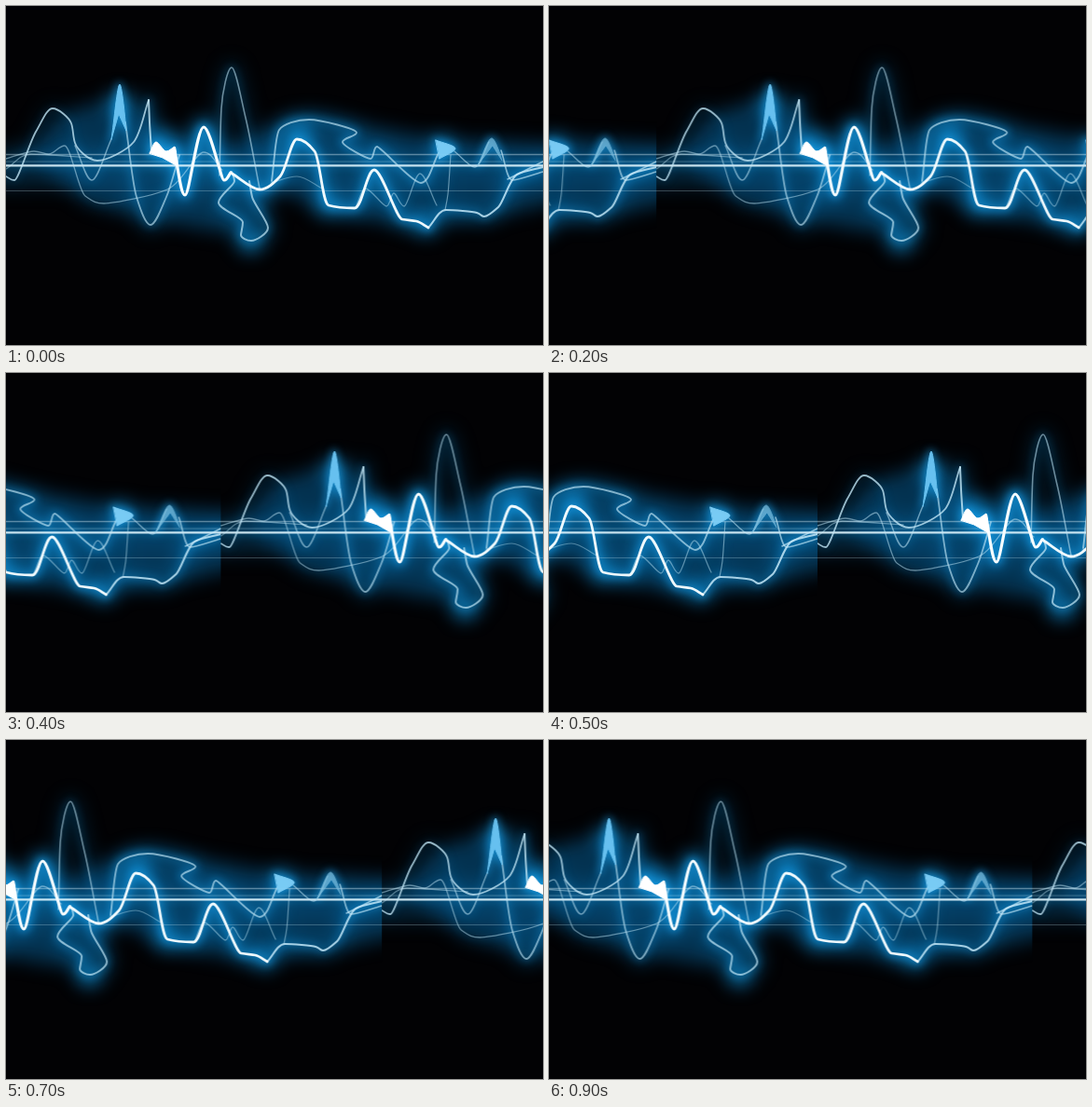
An HTML page that plays this animation: 576x364 px, repeating every 1000 ms.

```html
<!DOCTYPE html>
<html lang="en">
<head>
<meta charset="utf-8">
<title>Electric wave</title>
<style>
  html, body { margin: 0; width: 100%; height: 100%; overflow: hidden; background: #020204; }
  #stage { display: block; width: 576px; height: 364px; overflow: hidden; }
  #strip { animation: scroll 1s steps(10) infinite; }
  @keyframes scroll { to { transform: translateX(576px); } }
  #tile path { fill: none; stroke-linecap: round; stroke-linejoin: round; }
  #tile .solid { fill: currentColor; }
</style>
</head>
<body>
<svg id="stage" viewBox="0 0 576 364">
  <defs>
    <filter id="wide" filterUnits="userSpaceOnUse" x="-60" y="0" width="700" height="364" color-interpolation-filters="sRGB"><feGaussianBlur stdDeviation="10"/></filter>
    <filter id="close" filterUnits="userSpaceOnUse" x="-60" y="0" width="700" height="364" color-interpolation-filters="sRGB"><feGaussianBlur stdDeviation="4.5"/></filter>
    <filter id="soft" filterUnits="userSpaceOnUse" x="-60" y="0" width="700" height="364" color-interpolation-filters="sRGB"><feGaussianBlur stdDeviation="0.6"/></filter>
    <g id="tile">
      <rect width="577" height="364" fill="#020204"/>
      <g id="haze" filter="url(#wide)"><rect x="-40" y="153" width="660" height="42" fill="#064267" opacity=".45"/></g>
      <g id="glow" filter="url(#close)"/>
      <g id="core" filter="url(#soft)"/>
    </g>
  </defs>
  <g id="strip">
    <svg x="-576" width="577" height="364"><use href="#tile"/></svg>
    <svg width="576" height="364"><use href="#tile"/></svg>
  </g>
</svg>
<script>
  // Key points (mostly turning points), line width, brightness, glow strength
  const strands = [
    ['0,164 30,156 46,159 63,150 85,204 105,212 173,197 212,157 232,176', 1.3, .5, .12],
    ['0,175 27,159 92,163', 1.3, .45, 0],
    ['284,190 312,183 341,197', 1.2, .4, 0],
    ['375,216 386,196 408,215 416,201 427,215 444,180 462,214', 1.3, .45, .1],
    ['477,160 474,202 471,219', 1.2, .5, .1],
    ['481,156 503,173 518,146', 1.4, .55, .1],
    ['531,155 543,187 576,178', 1.6, .65, .2],
    ['538,186 576,167', 1.6, .7, .2],
    ['74,150 92,187 113,143', 1.5, .55, .2],
    ['128,125 140,205 155,235 172,205 186,160', 1.8, .62, .4],
    ['229,182 231,110 242,66 257,120 272,196', 1.6, .55, .25],
    ['0,183 9,187 32,135 50,110 70,126 74,147 98,166 137,146 153,101', 1.8, .78, .12],
    ['153,101 154,125 156,156', 2, .8, .3],
    ['242,178 245,188 228,211 254,232 252,246 263,252 281,238 264,205 261,188', 2, .7, .45],
    ['285,188 293,133 325,122 376,136 361,146 391,164 398,151 445,190 464,158', 1.9, .65, .5],
    ['453,238 472,219 505,222 513,226 528,216 548,181 576,173', 2.1, .85, .5],
    ['181,158 192,203 212,130 234,187 241,179', 3.2, 1, .8],
    ['241,179 272,197 294,183 312,143 331,156 346,214 374,217 395,176 425,229 440,231 453,238', 2.8, .97, .75]
  ];
  // Closed shapes: key points, fill, opacity
  const solids = [
    ['113,143 122,84 129,134 121,116', '#6cc5f3', .95],
    ['461,144 482,153 465,164', '#7fcff7', .95],
    ['506,171 521,142 532,166 522,150', '#7cbfe0', .7],
    ['154,158 161,146 172,156 181,151 184,172 168,163', '#fff', 1]
  ];
  const body = '25,165 50,125 122,100 170,132 230,150 325,120 470,142 620,152 620,195 450,235 350,222 290,198 262,246 150,228 85,208';
  // Bright spots: x, y, radius
  const spots = [[122, 105, 12], [167, 152, 17], [212, 134, 11], [314, 138, 14], [345, 212, 13], [448, 233, 11], [468, 150, 11], [262, 252, 12]];
  // Horizontal lines: y, width, brightness
  const lines = [[159.5, 1.6, .4], [167, 1, .25], [198.5, 1.1, .25], [171.3, 2.3, .88]];

  // Tangent that goes flat at a turning point, so curves never overshoot
  const slope = (a, b, c) => (b - a) * (c - b) > 0 ? 2 * (b - a) * (c - b) / (c - a) : 0;

  function curve(text) {
    const p = text.split(' ').map(s => s.split(',').map(Number));
    const last = p.length - 1;
    const tangent = i => [0, 1].map(k =>
      i === 0 ? p[1][k] - p[0][k] :
      i === last ? p[i][k] - p[i - 1][k] :
      slope(p[i - 1][k], p[i][k], p[i + 1][k]));
    const handle = (i, dir) => tangent(i).map((t, k) => p[i][k] + dir * t / 3);
    let d = 'M' + p[0];
    for (let i = 1; i <= last; i++) d += 'C' + [handle(i - 1, 1), handle(i, -1), p[i]].join(' ');
    return d;
  }

  function add(layer, tag, attrs) {
    const el = document.createElementNS('http://www.w3.org/2000/svg', tag);
    for (const key in attrs) el.setAttribute(key, attrs[key]);
    document.getElementById(layer).append(el);
  }
  const stroke = (layer, d, color, width, opacity) =>
    add(layer, 'path', { d, stroke: color, 'stroke-width': width, opacity });
  const fill = (layer, d, color, opacity, edge = 0) =>
    add(layer, 'path', { d: d + 'Z', class: 'solid', color, opacity, stroke: color, 'stroke-width': edge });

  fill('haze', curve(body), '#06598e', .55);
  for (const [cx, cy, r] of spots) add('haze', 'circle', { cx, cy, r, fill: '#109be6', opacity: .8 });

  for (const [y, width, light] of lines) stroke('core', `M-9 ${y}H585`, '#e2f5fd', width, light);
  stroke('glow', 'M-9 171H585', '#1687c4', 5, .45);

  for (const [points, width, light, glow] of strands) {
    const d = curve(points);
    stroke('haze', d, '#0b82c6', 10 + 2 * width, glow * .85);
    stroke('glow', d, '#169de8', 3 + 1.6 * width, glow * .75);
    stroke('core', d, light > .9 ? '#f6fdff' : '#c4e8f8', width, light);
  }
  for (const [points, color, opacity] of solids) {
    const d = curve(points);
    fill('glow', d, '#1ba4ee', .6, 5);
    fill('core', d, color, opacity, 1);
  }
</script>
</body>
</html>
```
